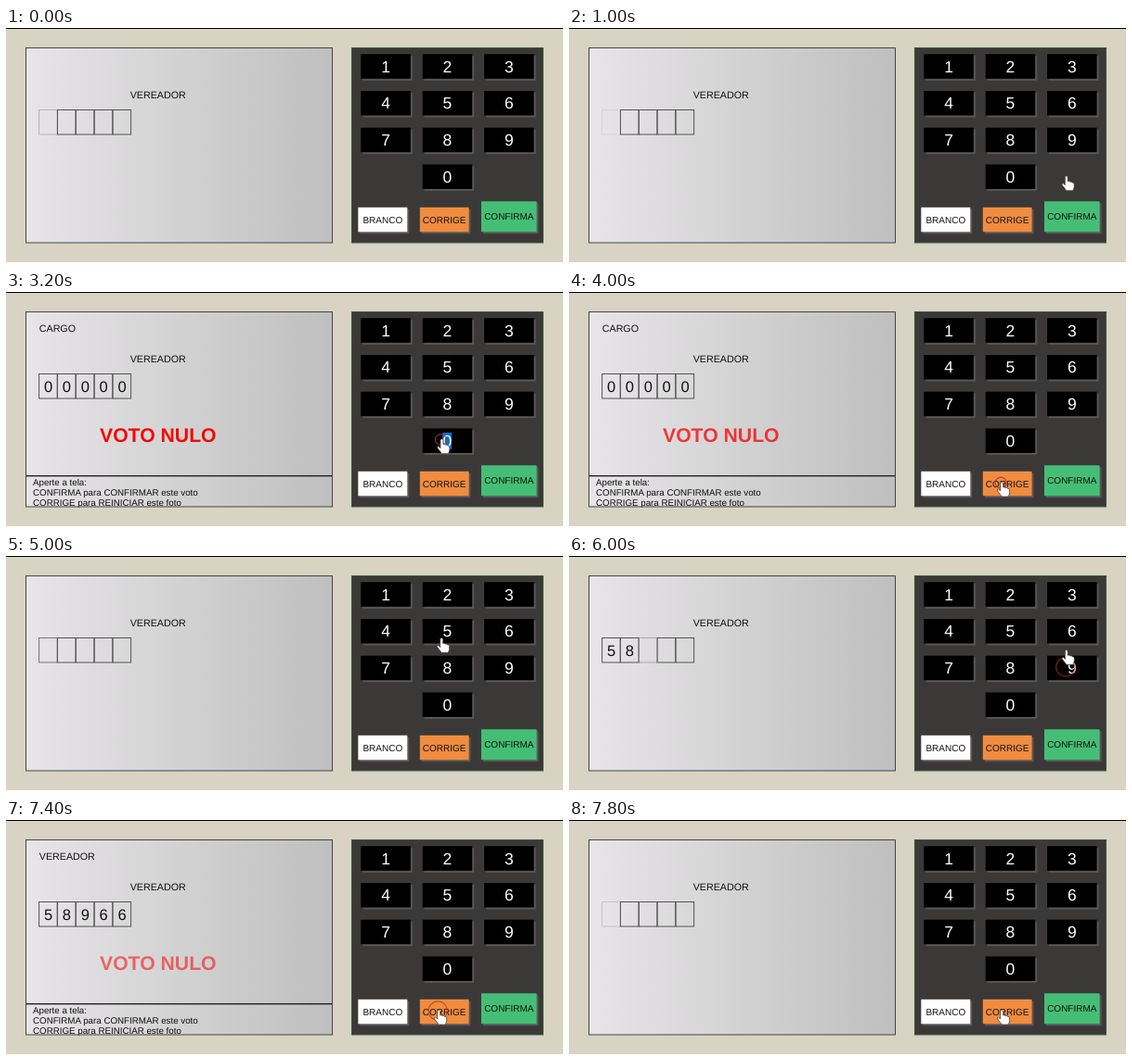
Recreate the animation shown at these times as an HTML page with a canvas. Size 600 by 255 pixels, loop 8000 ms.

```html
<!DOCTYPE html>
<html lang="pt">
<head>
<meta charset="utf-8">
<style>
html, body { margin: 0; width: 100%; height: 100%; overflow: hidden; background: #d8d3c3; }
canvas { display: block; }
</style>
</head>
<body>
<canvas id="stage" width="600" height="255"></canvas>
<script>
const ctx = document.getElementById('stage').getContext('2d');
const LOOP = 8000, STEP = 200, LAG = 200, BLINK = 900, SLOTS = 5;
const FONT = '"Liberation Sans", Arial, sans-serif';
const HEADINGS = ['CARGO', 'VEREADOR'];

const keys = {};
for (let n = 0; n < 10; n++) {
  const col = n ? (n - 1) % 3 : 1;
  const row = n ? Math.floor((n - 1) / 3) : 3;
  keys[n] = { x: 382.3 + col * 66.4, y: 28.3 + row * 39.7, w: 53.5, h: 26.5, color: '#000', ink: '#fff', size: 17.5 };
}
function addButton(label, x, y, w, h, color) {
  keys[label] = { x, y, w, h, color, ink: '#111', size: 10 };
}
addButton('BRANCO', 379.3, 193.8, 53, 26.5, '#fff');
addButton('CORRIGE', 445.8, 193.8, 52.8, 26.5, '#f08c3f');
addButton('CONFIRMA', 512, 187.3, 59.6, 33, '#45be75');

// The hand's stops in order of time; a press acts LAG ms later.
const stops = [];
function stop(time, key, press = false) {
  const { x, y, w, h } = keys[key];
  stops.push({ time, key, press, x: x + w / 2 - 6, y: y + h / 2 - 2 });
}
const hover = (time, key) => stop(time, key);
const press = (time, key) => stop(time, key, true);
const type = (time, digits, gap) => [...digits].forEach((d, i) => press(time + i * gap, d));

press(-500, 'CORRIGE');
hover(200, 'CORRIGE');
hover(600, '3');
hover(1200, 'CONFIRMA');
press(1600, '0');
type(2400, '00000', 200);
press(4000, 'CORRIGE');
type(5200, '58966', 325);
press(6600, '3');
hover(6800, '8');
press(7250, 'CORRIGE');
hover(LOOP, 'CORRIGE');

function stateAt(t) {
  const state = { digits: '', start: 0, round: -1 };
  for (const s of stops) {
    const time = s.time + LAG;
    if (!s.press || time > t) continue;
    if (s.key === 'CORRIGE') {
      state.digits = '';
      state.round++;
    } else if (state.digits.length < SLOTS) {
      state.digits += s.key;
    } else continue;
    state.start = time;
  }
  return state;
}

function handAt(t) {
  const i = stops.findIndex(s => s.time > t);
  const a = stops[i - 1], b = stops[i];
  const k = (t - a.time) / (b.time - a.time);
  const ease = k * k * (3 - 2 * k);
  return { x: a.x + (b.x - a.x) * ease, y: a.y + (b.y - a.y) * ease };
}

const blink = age => Math.abs(1 - 2 * (age % BLINK) / BLINK);

function rect(x, y, w, h, color) {
  ctx.fillStyle = color;
  ctx.fillRect(x, y, w, h);
}

function frame(x, y, w, h, color) {
  ctx.strokeStyle = color;
  ctx.lineWidth = 1;
  ctx.strokeRect(x, y, w, h);
}

function text(str, x, y, size, color = '#111', align = 'left', weight = '') {
  ctx.font = `${weight} ${size}px ${FONT}`;
  ctx.textRendering = 'geometricPrecision';
  ctx.textAlign = align;
  ctx.fillStyle = color;
  ctx.fillText(str, x, y);
}

function drawScreen(t) {
  const { digits, start, round } = stateAt(t);
  const glow = blink(t - start);
  const grad = ctx.createLinearGradient(22, 0, 352, 0);
  grad.addColorStop(0, '#e7e5e7');
  grad.addColorStop(1, '#bfbfbf');
  rect(22, 22, 330, 210, grad);

  text('VEREADOR', 133.7, 76, 10.7);
  for (let i = 0; i < SLOTS; i++) {
    const x = 35.6 + i * 19.85;
    ctx.globalAlpha = i === digits.length ? glow : 1;
    frame(x, 88.5, 19.6, 26.5, '#555');
    ctx.globalAlpha = 1;
    if (digits[i]) text(digits[i], x + 10, 108, 16.5, '#111', 'center');
  }

  if (digits.length === SLOTS) {
    text(HEADINGS[round], 35.8, 43, 10.7);
    ctx.globalAlpha = glow;
    text('VOTO NULO', 101, 162, 21.2, '#f40804', 'left', 'bold');
    ctx.globalAlpha = 1;
    rect(22, 198, 330, 1.4, '#222');
    ['Aperte a tela:', 'CONFIRMA para CONFIRMAR este voto', 'CORRIGE para REINICIAR este foto']
      .forEach((line, i) => text(line, 29, 208.5 + i * 11, 9.75));
  }
  frame(21.5, 21.5, 330, 210.5, '#444');
}

function drawKey(label, selected) {
  const { x, y, w, h, color, ink, size } = keys[label];
  rect(x + 2, y + 2, w, h, '#585656');
  rect(x, y, w, h, color);
  if (selected) rect(x + 21.5, y + 4.5, 10, 18, '#0a70cf');
  text(label, x + w / 2, y + h / 2 + size * 0.345, size, ink, 'center');
}

function drawKeypad(t) {
  rect(372, 22, 207, 210, '#3b3838');
  frame(372.5, 21.5, 206, 210.5, '#2f5a35');
  for (const label in keys) {
    drawKey(label, label === '0' && t >= 2000 && t < 3600);
  }
}

function drawRing(t) {
  const last = stops.filter(s => s.press && s.time <= t).pop();
  const age = (t - last.time) / STEP;
  if (age > 1) return;
  ctx.globalAlpha = 0.8 - 0.2 * age;
  ctx.strokeStyle = '#b5302a';
  ctx.lineWidth = 1.2;
  ctx.beginPath();
  ctx.arc(last.x - 1, last.y + 1, 6 + 5.5 * age, 0, Math.PI * 2);
  ctx.stroke();
  ctx.globalAlpha = 1;
}

const hand = new Path2D('M-1.5 1Q0 -1 1.5 1V6Q3 5 4 6.6Q5.5 5.8 6.4 7.4Q8.4 6.8 8.4 9V12Q8 14 7 16H0L-4.5 10Q-5.5 8 -3.5 8L-1.5 10Z');

function drawHand(t) {
  const { x, y } = handAt(t);
  ctx.save();
  ctx.translate(x, y);
  ctx.fillStyle = '#fff';
  ctx.fill(hand);
  ctx.strokeStyle = '#333';
  ctx.lineWidth = 0.7;
  ctx.stroke(hand);
  ctx.restore();
}

function draw(now) {
  const t = Math.floor(now % LOOP / STEP) * STEP;
  rect(0, 0, 600, 255, '#d8d3c3');
  rect(0, 0, 600, 1, '#000');
  rect(0, 253, 600, 2, '#fdfdf4');
  drawScreen(t);
  drawKeypad(t);
  drawRing(t);
  if (t > 0) drawHand(t);
}

const begin = performance.now();
function tick() {
  draw(performance.now() - begin);
  requestAnimationFrame(tick);
}
tick();
</script>
</body>
</html>
```
